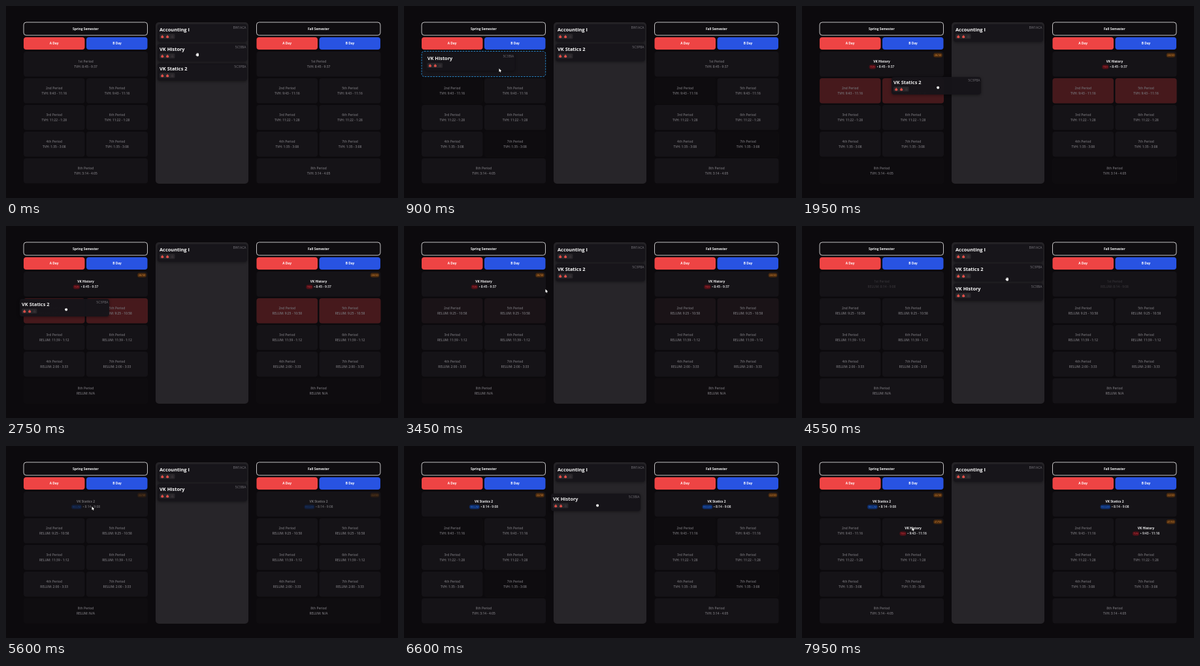
An HTML page with a canvas that plays this animation: 600x295 px, repeating every 8000 ms.

```html
<!DOCTYPE html>
<html lang="en">
<head>
<meta charset="utf-8">
<title>Schedule planner</title>
<style>
html, body { margin: 0; width: 100%; height: 100%; overflow: hidden; background: #0c0a0d; }
canvas { display: block; width: 600px; height: 295px; }
</style>
</head>
<body>
<canvas id="stage"></canvas>
<script>
const W = 600, H = 295, LOOP = 8000;
const FONT = '"Open Sans", "Noto Sans", sans-serif';
const CARD_W = 137, CARD_H = 27, LIST_X = 232, SETTLE = 190;
const FALL_X = 356.5;
const canvas = document.getElementById('stage');
const ctx = canvas.getContext('2d');
const ratio = window.devicePixelRatio || 1;
canvas.width = W * ratio;
canvas.height = H * ratio;

const CAMPUS = [
  { name: 'TVH', fill: '#4c1017', ink: '#e03c42', width: 10.5 },
  { name: 'RELUM', fill: '#0f2c66', ink: '#2f78e8', width: 16 }
];
const COURSES = {
  accounting: { title: 'Accounting I', code: 'BW1ACA' },
  history: { title: 'VK History', code: '5C3BIA', campus: 0 },
  statics: { title: 'VK Statics 2', code: '5C3PBA', campus: 1 }
};
const CELLS = [
  cell('1st', 0, 0, ['8:45 - 9:37', '8:14 - 9:08']),
  cell('2nd', 1, 1, ['9:43 - 11:16', '9:25 - 10:58']),
  cell('5th', 1, 2, ['9:43 - 11:16', '9:25 - 10:58']),
  cell('3rd', 2, 1, ['11:22 - 1:28', '11:39 - 1:12']),
  cell('6th', 2, 2, ['11:22 - 1:28', '11:39 - 1:12']),
  cell('4th', 3, 1, ['1:35 - 3:08', '2:00 - 3:33']),
  cell('7th', 3, 2, ['1:35 - 3:08', '2:00 - 3:33']),
  cell('8th', 4, 0, ['3:14 - 4:05', 'N/A'])
];

// Cards in flight: grab and drop times, grab point inside the card, resting place.
const DRAGS = [
  { course: 'history', grab: 150, drop: 780, dx: 61, dy: 17, to: [30, 72], target: '1st', dim: ['2nd', '7th'] },
  { course: 'statics', grab: 1720, drop: 3180, dx: 71, dy: 16, to: [LIST_X, 58], dim: ['8th'], clash: ['2nd', '5th'] },
  { course: 'history', grab: 3800, drop: 4240, dx: 61, dy: 17, to: [LIST_X, 88], dim: [] },
  { course: 'statics', grab: 4650, drop: 5350, dx: 82, dy: 24, to: [30, 72], target: '1st', dim: ['8th'] },
  { course: 'history', grab: 6400, drop: 7300, dx: 71, dy: 18, to: [124, 113], target: '5th', dim: ['2nd', '7th'] }
];
const BOOKINGS = [
  { cell: '1st', course: 'history', seats: '28/30', from: 970, to: 3800 },
  { cell: '1st', course: 'statics', seats: '22/30', from: 5540, to: LOOP },
  { cell: '5th', course: 'history', seats: '41/50', from: 7490, to: LOOP }
];
// Place of each listed card over time: [from, to, slot].
const LISTED = {
  accounting: [[0, LOOP, 0]],
  statics: [[0, 200, 2], [200, 1720, 1], [3370, 4650, 1]],
  history: [[0, 150, 1], [4430, 4700, 2], [4700, 6400, 1]]
};
const PATH = [
  [0, 293, 75], [150, 293, 75], [720, 147, 99], [1080, 147, 99], [1620, 303, 74],
  [1720, 303, 74], [1950, 208, 125], [2400, 166, 130], [2750, 92, 128],
  [3150, 214, 103], [3450, 218, 100], [3750, 122, 90], [3820, 122, 90],
  [4220, 302, 106], [4500, 314, 82], [4650, 314, 82], [5280, 133, 96],
  [5650, 133, 96], [6300, 303, 76], [6450, 303, 76], [6600, 296, 91],
  [7250, 171, 130], [7600, 170, 128], [LOOP, 170, 128]
];

function cell(name, row, half, times) {
  return {
    name, times,
    x: half === 2 ? 123 : 27,
    y: 70 + row * 41,
    w: half ? (half === 1 ? 93.5 : 94) : 190,
    h: 38.5
  };
}

const clamp = v => Math.max(0, Math.min(1, v));
const ramp = (t, start, length) => clamp((t - start) / length);
const smooth = p => p * p * (3 - 2 * p);
const easeOut = p => 1 - (1 - p) ** 3;
const mix = (a, b, p) => a + (b - a) * p;

function cursorAt(t) {
  let i = 1;
  while (i < PATH.length - 1 && PATH[i][0] < t) i++;
  const [t0, x0, y0] = PATH[i - 1], [t1, x1, y1] = PATH[i];
  const p = smooth(ramp(t, t0, t1 - t0));
  return [mix(x0, x1, p), mix(y0, y1, p)];
}

function box(x, y, w, h, r, fill, stroke, line = 1) {
  ctx.beginPath();
  ctx.roundRect(x, y, w, h, r);
  if (fill) { ctx.fillStyle = fill; ctx.fill(); }
  if (stroke) { ctx.strokeStyle = stroke; ctx.lineWidth = line; ctx.stroke(); }
}

function text(str, x, y, size, color, weight = 700, align = 'center') {
  ctx.font = `${weight} ${size}px ${FONT}`;
  ctx.textAlign = align;
  ctx.fillStyle = color;
  ctx.fillText(str, x, y);
}

function faded(alpha, draw) {
  if (alpha <= 0) return;
  ctx.save();
  ctx.globalAlpha *= alpha;
  draw();
  ctx.restore();
}

function flame(x, y, color) {
  ctx.beginPath();
  ctx.moveTo(x - 0.3, y - 2.8);
  ctx.bezierCurveTo(x + 0.5, y - 1, x + 2.2, y - 0.6, x + 2.1, y + 1);
  ctx.bezierCurveTo(x + 2, y + 3, x - 2, y + 3, x - 2.1, y + 1);
  ctx.bezierCurveTo(x - 2.1, y, x - 1.5, y - 0.5, x - 1.3, y - 1);
  ctx.quadraticCurveTo(x - 0.2, y - 0.6, x - 0.3, y - 2.8);
  ctx.fillStyle = color;
  ctx.fill();
}

function card(key, x, y) {
  const { title, code } = COURSES[key];
  ctx.save();
  ctx.shadowColor = 'rgba(0,0,0,.45)';
  ctx.shadowBlur = 4 * ratio;
  ctx.shadowOffsetY = ratio;
  box(x, y, CARD_W, CARD_H, 4, '#17151a');
  ctx.restore();
  text(title, x + 3, y + 11, 7.4, '#fafafa', 700, 'left');
  text(code, x + 135.5, y + 6.6, 5, '#78767c', 400, 'right');
  box(x + 3, y + 15, 23.5, 7.6, 1.5, '#29272b');
  flame(x + 7.3, y + 18.8, '#e2504a');
  flame(x + 15.2, y + 18.8, '#e2504a');
  flame(x + 22.6, y + 18.8, '#363035');
}

function booking(c, b) {
  const course = COURSES[b.course], campus = CAMPUS[course.campus];
  const mid = c.x + c.w / 2;
  text(course.title, mid, c.y + 16.9, 4.9, '#f4f4f5');
  const line = '• ' + c.times[course.campus];
  ctx.font = `600 4.9px ${FONT}`;
  const total = campus.width + 1.5 + ctx.measureText(line).width;
  const x = mid - total / 2;
  box(x, c.y + 20.2, campus.width, 6.8, 3.4, campus.fill);
  text(campus.name, x + campus.width / 2, c.y + 25, 3.7, campus.ink, 400);
  text(line, x + campus.width + 1.5, c.y + 25.3, 4.9, '#eeeef0', 600, 'left');
  box(c.x + c.w - 16, c.y + 2, 14, 7, 3.5, '#45280f');
  text(b.seats, c.x + c.w - 9, c.y + 7, 4, '#c77a2c', 600);
}

// How strongly a cell is marked by the drags, from 0 to 1.
function mark(name, kind, t) {
  return Math.max(0, ...DRAGS.filter(d => (d[kind] || []).includes(name))
    .map(d => ramp(t, d.grab, 180) * (1 - ramp(t, d.drop + (kind === 'dim' ? SETTLE : 0), 300))));
}

function period(c, t) {
  box(c.x, c.y, c.w, c.h, 4, '#151317');
  faded(mark(c.name, 'dim', t), () => box(c.x, c.y, c.w, c.h, 4, '#0e0c0f'));
  faded(mark(c.name, 'clash', t), () => box(c.x, c.y, c.w, c.h, 4, '#46191c'));
  const b = BOOKINGS.find(k => k.cell === c.name && t >= k.from && t < k.to);
  if (b) {
    faded(ramp(t, b.from, 150), () => booking(c, b));
    return;
  }
  const vacated = c.name === '1st' && t >= 3800 && t < 4900;
  const mode = t >= 2150 && t < 6400 ? 1 : 0;
  faded(vacated ? ramp(t, 4450, 300) : 1, () => {
    const mid = c.x + c.w / 2;
    text(c.name + ' Period', mid, c.y + 16.9, 4.9, '#706e73', 600);
    text(`${CAMPUS[mode].name}: ${c.times[mode]}`, mid, c.y + 24.8, 4.9, '#77757a', 600);
  });
}

function semester(title, shift, t) {
  ctx.save();
  ctx.translate(shift, 0);
  box(27, 25, 189.5, 20, 4, '#0f0d10', '#d8d7d9', 0.9);
  text(title, 121.8, 36.9, 4.9, '#f4f4f5');
  box(27, 48, 93.5, 19, 4, '#ee4444');
  text('A Day', 73.6, 59.4, 4.8, '#fff');
  box(123, 48, 93.5, 19, 4, '#2853e2');
  text('B Day', 170, 59.4, 4.8, '#fff');
  CELLS.forEach(c => period(c, t));
  ctx.restore();
}

function list(t) {
  box(229, 25, 142, 248, 5, '#272529');
  for (const key in LISTED) {
    const spans = LISTED[key];
    const i = spans.findIndex(([from, to]) => t >= from && t < to);
    if (i < 0) continue;
    const [from, , slot] = spans[i];
    const joined = i > 0 && spans[i - 1][1] === from;
    const place = joined ? mix(spans[i - 1][2], slot, easeOut(ramp(t, from, 200))) : slot;
    card(key, LIST_X, 28 + 30 * place);
  }
}

function dragged(d, t) {
  const [cx, cy] = cursorAt(Math.min(t, d.drop));
  const p = easeOut(ramp(t, d.drop, SETTLE));
  const x = mix(cx - d.dx, d.to[0], p), y = mix(cy - d.dy, d.to[1], p);
  const c = CELLS.find(k => k.name === d.target);
  if (c && cx > c.x && cx < c.x + c.w && cy > c.y && cy < c.y + c.h) {
    ctx.setLineDash([2.6, 1.6]);
    box(c.x, c.y - 0.5, c.w - 0.3, c.h + 0.5, 4, '#17151a', '#2583c4', 1);
    ctx.setLineDash([]);
  }
  faded(0.95, () => card(d.course, x, y));
}

function arrow(x, y) {
  ctx.beginPath();
  [[0, 0], [0, 5.2], [1.2, 4.2], [2, 6], [2.9, 5.6], [2.1, 3.9], [3.7, 3.8]]
    .forEach(([dx, dy]) => ctx.lineTo(x - 1.5 + dx, y - 3 + dy));
  ctx.closePath();
  ctx.strokeStyle = '#111';
  ctx.lineWidth = 0.8;
  ctx.stroke();
  ctx.fillStyle = '#fff';
  ctx.fill();
}

function hand(x, y, closed) {
  const top = closed ? 1.5 : 2.8;
  box(x - 1.7, y - 1.2, 3.8, 3.6, 1.3, '#fff', '#222', 0.4);
  for (let i = 0; i < 3; i++) {
    box(x - 1.5 + i * 1.15, y - top + (i === 1 ? -0.2 : 0.2), 1, top + 1, 0.5, '#fff');
  }
  if (!closed) box(x - 2.6, y - 0.4, 1.6, 1.2, 0.6, '#fff');
}

function cursor(t) {
  const [x, y] = cursorAt(t);
  const held = DRAGS.some(d => t >= d.grab && t < d.drop);
  const onCard = x > LIST_X && x < LIST_X + CARD_W && y < 116;
  if (held || onCard) hand(x, y, held);
  else arrow(x, y);
}

function draw(t) {
  ctx.setTransform(ratio, 0, 0, ratio, 0, 0);
  ctx.fillStyle = '#0c0a0d';
  ctx.fillRect(0, 0, W, H);
  semester('Spring Semester', 0, t);
  semester('Fall Semester', FALL_X, t);
  list(t);
  const d = DRAGS.find(k => t >= k.grab && t < k.drop + SETTLE);
  if (d) dragged(d, t);
  cursor(t);
}

const start = performance.now();
function tick() {
  draw((performance.now() - start) % LOOP);
  requestAnimationFrame(tick);
}
tick();
</script>
</body>
</html>
```
